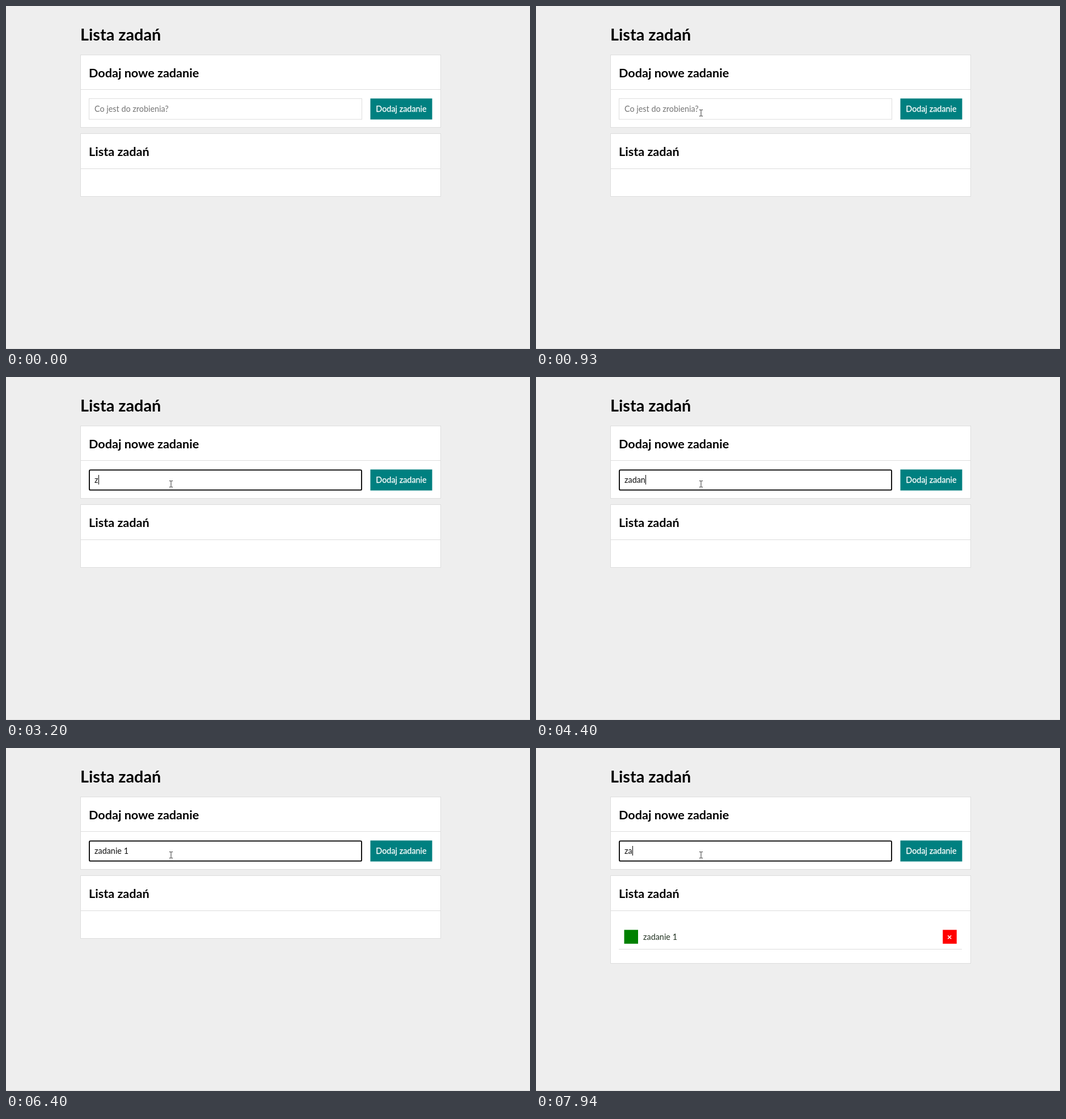
An HTML page for the animation above (8000 ms loop, 924x606 px).

```html
<!DOCTYPE html>
<html lang="pl">
<head>
<meta charset="utf-8">
<title>Lista zadań</title>
<style>
  html, body { margin: 0; height: 100%; overflow: hidden; background: #eee; }
  svg { display: block; width: 924px; height: 606px; }
  text { font: 14.4px Lato, sans-serif; white-space: pre; }
  text.h1 { font-size: 28.8px; font-weight: 700; }
  text.h2 { font-size: 21.6px; font-weight: 700; }
  .card { fill: #fff; stroke: #ddd; }
  .rule { fill: #ddd; }
  .button { fill: #fff; stroke: #fff; stroke-width: .25px; text-anchor: middle; }
</style>
</head>
<body>
<svg viewBox="0 0 924 606">
  <rect class="rule" y="605" width="924" height="1"/>
  <text class="h1" x="131" y="61">Lista zadań</text>

  <rect class="card" x="131.5" y="86.5" width="635" height="128"/>
  <rect class="rule" x="132" y="147" width="634" height="1"/>
  <text class="h2" x="146" y="126">Dodaj nowe zadanie</text>
  <rect id="field" x="146.5" y="163.6" width="481" height="36.6" fill="#fff" stroke="#ddd"/>
  <rect id="ring" x="147" y="164.3" width="480" height="35.4" rx="2" fill="none" stroke="#000" stroke-width="1.8"/>
  <text id="hint" x="156" y="187" fill="#757575">Co jest do zrobienia?</text>
  <text id="typed" x="156" y="187" fill="#111"></text>
  <rect id="caret" x="156" y="173" width="1" height="17"/>
  <rect x="642.5" y="163.4" width="109" height="37.1" fill="#008080"/>
  <text class="button" x="697" y="187">Dodaj zadanie</text>

  <rect id="list" class="card" x="131.5" y="225.5" width="635" height="111"/>
  <rect class="rule" x="132" y="287" width="634" height="1"/>
  <text class="h2" x="146" y="265">Lista zadań</text>
  <g id="item">
    <rect x="155.5" y="321.3" width="24.5" height="24.5" fill="#008000"/>
    <text x="189" y="339" fill="#233323">zadanie 1</text>
    <rect x="717.3" y="321.3" width="24.5" height="24.5" fill="#f00"/>
    <path d="M726.2 331.2l6 6m0-6l-6 6" stroke="#fff" stroke-width="1.6"/>
    <rect class="rule" x="146" y="355" width="605" height="1"/>
  </g>

  <g id="mouse">
    <path id="arrow" d="M.5.5v14.6l3.3-3.1 2.2 4.9 2.3-1-2.2-4.8h4.6z" fill="#fff" stroke="#000" stroke-width=".9"/>
    <path id="beam" d="M-3-5.5h2.3l.7.7.7-.7H3M0-5V5M-3 5.5h2.3l.7-.7.7.7H3" fill="none" stroke="#333"/>
  </g>
</svg>
<script>
const LOOP = 8000, ADDED = 6460, FOCUS = 1200;
const el = id => document.getElementById(id);
const show = (id, on) => el(id).setAttribute('visibility', on ? 'visible' : 'hidden');

// [time, letters typed, caret visible]
const word = 'zadanie 1';
const steps = [
  [0, 0, 0], [FOCUS, 0, 1], [1750, 0, 0], [2280, 0, 1], [2740, 0, 0],
  [3200, 1, 1], [3470, 2, 1], [3870, 3, 1], [4000, 4, 1], [4400, 5, 1],
  [4620, 6, 1], [4880, 7, 1], [5410, 8, 1], [5870, 9, 1], [6400, 9, 0],
  [ADDED, 0, 0], [6940, 0, 1], [7410, 0, 0], [7740, 1, 1], [7940, 2, 1]
];

// Pointer glides along a quadratic curve in ten discrete hops.
const move = { from: 320, to: 930, hops: 9, a: [762, 552], b: [390, 320], c: [291, 189] };

function pointer(t) {
  const raw = (t - move.from) / (move.to - move.from);
  const u = Math.min(1, Math.floor(raw * move.hops + 1e-6) / move.hops);
  const p = (1 - Math.cos(Math.PI * u)) / 2, q = 1 - p;
  return move.a.map((a, i) => q * q * a + 2 * q * p * move.b[i] + p * p * move.c[i]);
}

function draw(t) {
  const [, count, caret] = steps.findLast(s => s[0] <= t);
  const typed = el('typed');
  typed.textContent = word.slice(0, count);
  show('hint', !count);
  show('caret', caret);
  el('caret').setAttribute('x', 156 + (count ? Math.round(typed.getComputedTextLength()) : 0));
  show('ring', t >= FOCUS);

  const added = t >= ADDED;
  show('item', added);
  el('list').setAttribute('height', added ? 155 : 111);

  const [x, y] = pointer(Math.max(t, move.from));
  const moving = t >= move.from;
  const inField = x > 146 && x < 628 && y > 163 && y < 201;
  el('mouse').setAttribute('transform', `translate(${Math.round(x)} ${Math.round(y)})`);
  show('arrow', moving && !inField);
  show('beam', moving && inField);
}

const start = performance.now();
function frame() {
  draw((performance.now() - start) % LOOP);
  requestAnimationFrame(frame);
}
frame();
</script>
</body>
</html>
```
